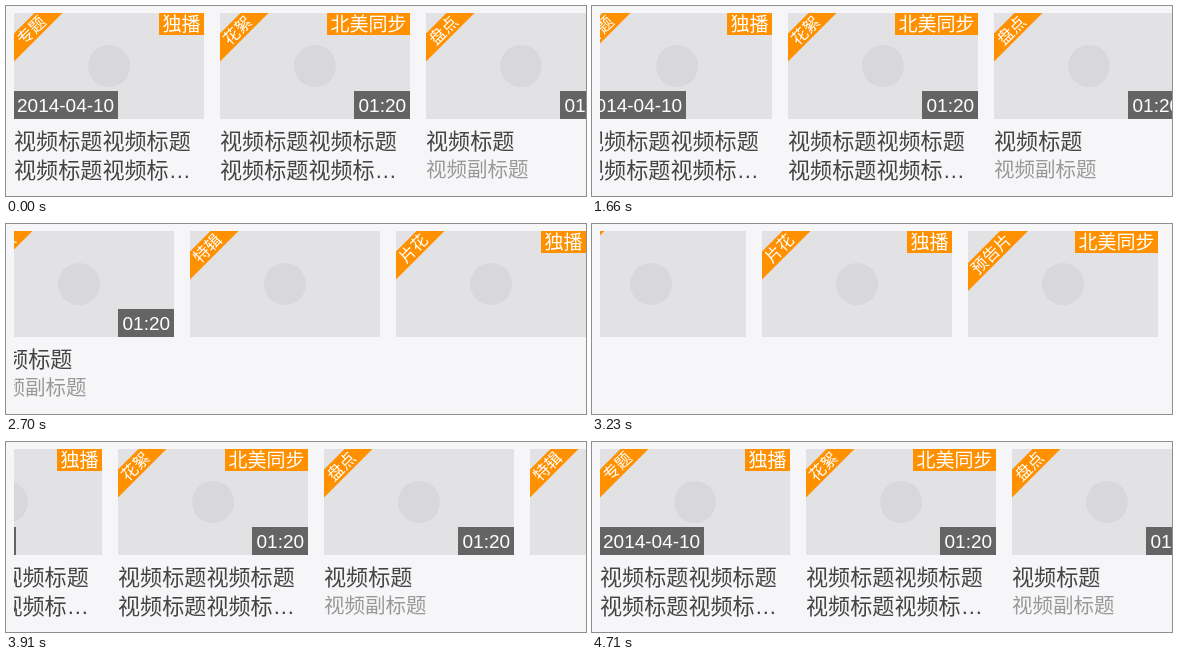
An HTML page for the animation above (4.87 s loop, 580 by 190 pixels).

```html
<!DOCTYPE html>
<html lang="zh-CN">
<head>
<meta charset="utf-8">
<title>视频列表</title>
<style>
  html, body { margin: 0; width: 100%; height: 100%; overflow: hidden; background: #f6f6f8; }
  svg { display: block; }
  text { font-family: "Liberation Sans", "Noto Sans CJK SC", "Noto Sans CJK", sans-serif; }
</style>
</head>
<body>
<svg id="stage" width="580" height="190" viewBox="0 0 580 190">
  <svg x="8" y="0" width="572" height="190" overflow="hidden"><g id="track"></g></svg>
</svg>
<script>
const ORANGE = '#ff9000', WIDTH = 190, PITCH = 206, TOP = 7, HEIGHT = 106;
const LOOP = 4870, START = 1660, STEPS = 53, STEP = (4710 - START) / STEPS;

const longTitle = ['视频标题视频标题', '视频标题视频标…'];
const cards = [
  { ribbon: '专题', badge: '独播', date: '2014-04-10', title: longTitle },
  { ribbon: '花絮', badge: '北美同步', time: '01:20', title: longTitle },
  { ribbon: '盘点', time: '01:20', title: ['视频标题'], sub: '视频副标题' },
  { ribbon: '特辑' },
  { ribbon: '片花', badge: '独播' },
  { ribbon: '预告片', badge: '北美同步' }
];

// Scroll offset by step: two flicks forward, one back.
const keys = [
  [-1, 0], [0, 18], [3, 150], [8, 285], [13, 375], [18, 442], [22, 575],
  [27, 662], [30, 645], [34, 390], [39, 102], [45, 22], [53, 0]
];

const track = document.getElementById('track');

function add(parent, tag, attrs, content) {
  const el = document.createElementNS('http://www.w3.org/2000/svg', tag);
  for (const name in attrs) el.setAttribute(name, attrs[name]);
  if (content) el.textContent = content;
  parent.appendChild(el);
  return el;
}

const box = (g, x, y, width, height, fill) => add(g, 'rect', { x, y, width, height, fill });

const label = (g, x, y, size, fill, str, extra) =>
  add(g, 'text', { x, y, 'font-size': size, fill, ...extra }, str);

function drawRibbon(g, str) {
  const inner = 20.5 + (str.length - 2) * 11.5, outer = inner + 28;
  const mid = (inner + outer) / 4;
  const r = add(g, 'g', { transform: `translate(0 ${TOP})` });
  add(r, 'path', { d: `M${inner} 0H${outer}L0 ${outer}V${inner}Z`, fill: ORANGE });
  label(r, 0, 6, 16.3, '#fff', str, {
    'text-anchor': 'middle', transform: `translate(${mid} ${mid}) rotate(-45)`
  });
}

function drawCard(card, i) {
  const g = add(track, 'g', { transform: `translate(${i * PITCH} 0)` });
  box(g, 0, TOP, WIDTH, HEIGHT, '#e2e2e4');
  add(g, 'circle', { cx: 95, cy: 60, r: 21, fill: '#d8d8da' });
  drawRibbon(g, card.ribbon);
  if (card.badge) {
    const w = card.badge.length * 19 + 7;
    box(g, WIDTH - w, TOP, w, 22, ORANGE);
    label(g, WIDTH - w + 3.5, 25.2, 19, '#fff', card.badge);
  }
  if (card.date) {
    box(g, 0, 85, 104, 28, '#646465');
    label(g, 3, 105.5, 19, '#fff', card.date);
  }
  if (card.time) {
    box(g, WIDTH - 56, 85, 56, 28, '#646465');
    label(g, WIDTH - 51.5, 105.5, 19, '#fff', card.time);
  }
  (card.title || []).forEach((line, n) => label(g, 0, 143.4 + n * 28.4, 22.1, '#444', line));
  if (card.sub) label(g, 0, 170.8, 20.5, '#999', card.sub);
}

const rise = i => (keys[i + 1][1] - keys[i][1]) / (keys[i + 1][0] - keys[i][0]);

function slope(i) {
  if (i === 0 || i === keys.length - 1) return 0;
  const a = rise(i - 1), b = rise(i);
  return a * b > 0 ? 2 * a * b / (a + b) : 0;
}

// Monotone cubic through the keys.
function offsetAt(step) {
  if (step < 0 || step >= STEPS) return 0;
  const i = keys.findIndex((k, n) => step >= k[0] && step < keys[n + 1][0]);
  const [x0, y0] = keys[i], [x1, y1] = keys[i + 1];
  const h = x1 - x0, t = (step - x0) / h, u = 1 - t;
  return u * u * (1 + 2 * t) * y0 + t * t * (3 - 2 * t) * y1
    + h * t * u * (u * slope(i) - t * slope(i + 1));
}

function render(now) {
  const step = Math.floor((now % LOOP - START) / STEP + 0.001);
  track.setAttribute('transform', `translate(${-offsetAt(step).toFixed(1)} 0)`);
}

cards.forEach(drawCard);
const begin = performance.now();
function tick() {
  render(performance.now() - begin);
  requestAnimationFrame(tick);
}
tick();
</script>
</body>
</html>
```
